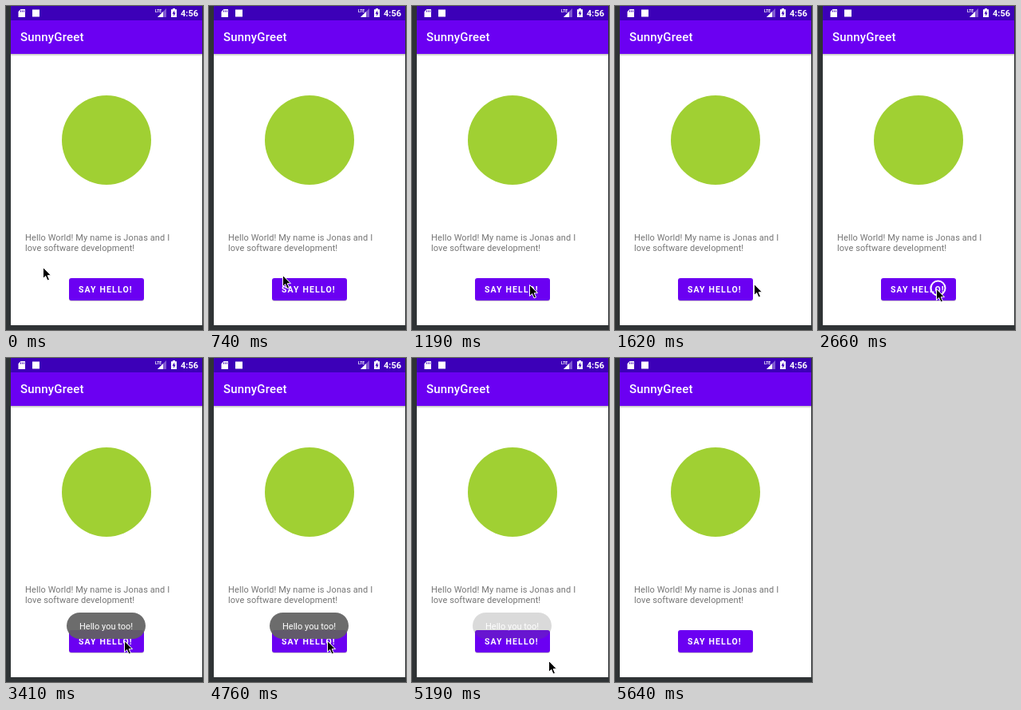
Write an HTML page that moves like this. It is 247x406 px and loops after 6.99 s.

```html
<!DOCTYPE html>
<html lang="en">
<head>
<meta charset="utf-8">
<title>Greeting app</title>
<style>
  html, body { margin: 0; width: 100%; height: 100%; overflow: hidden; background: #2f3335; }
  svg { display: block; width: 247px; height: 406px; }
  text { font-family: Roboto, "Open Sans", sans-serif; fill: #fff; white-space: pre; }
  .title { font-size: 15px; font-weight: 500; letter-spacing: .19px; }
  .body { font-size: 11px; letter-spacing: .1px; fill: #757575; }
  .label { font-size: 10.5px; font-weight: 700; letter-spacing: 1.15px; }
  .note { font-size: 11px; }
  .clock { font-size: 11px; font-weight: 700; }
  .lte { font-size: 5px; font-weight: 700; }
</style>
</head>
<body>
<svg viewBox="0 0 247 406">
  <defs>
    <linearGradient id="shade" x2="0" y2="1">
      <stop offset="0" stop-color="#000" stop-opacity=".26"/>
      <stop offset="1" stop-color="#000" stop-opacity="0"/>
    </linearGradient>
    <clipPath id="buttonClip"><rect x="79" y="341" width="94" height="28" rx="3"/></clipPath>
  </defs>

  <rect width="247" height="406" fill="#2f3335"/>
  <rect x="6" y="60" width="240" height="340" fill="#fff"/>
  <rect x="6" y="60" width="240" height="3" fill="url(#shade)"/>
  <rect x="6" y="18" width="240" height="42" fill="#6b00f2"/>
  <rect x="6" width="240" height="18" fill="#3c00b8"/>

  <!-- status bar -->
  <path d="M18.5 4H24V14H15.5V7Z" fill="#fff"/>
  <path d="M18.5 5.5V7.5M20.5 5.5V7.5M22.5 5.5V7.5" stroke="#3c00b8"/>
  <rect x="33" y="4.5" width="9" height="9" fill="#fff"/>
  <text class="lte" x="187" y="8">LTE</text>
  <path d="M201 3V14H190Z" fill="#fff" opacity=".35"/>
  <path d="M197 7V14H190Z" fill="#fff"/>
  <path d="M209 3H212V4.2H214V14H207V4.2H209Z" fill="#fff"/>
  <path d="M211.2 5.5L208.5 9.8H210.2V12.8L212.7 8.5H211.2Z" fill="#3c00b8"/>
  <text class="clock" x="219" y="13">4:56</text>

  <text class="title" x="18" y="44">SunnyGreet</text>
  <circle cx="126" cy="168" r="56" fill="#a0d033"/>
  <text class="body" x="24" y="294">Hello World! My name is Jonas and I</text>
  <text class="body" x="24" y="307">love software development!</text>

  <!-- button -->
  <rect x="79" y="342" width="94" height="28" rx="3" fill="#000" opacity=".2"/>
  <rect x="79" y="341" width="94" height="28" rx="3" fill="#6b00f2"/>
  <g clip-path="url(#buttonClip)"><circle id="ripple" cx="149" cy="355" fill="#fff"/></g>
  <text class="label" x="91" y="359">SAY HELLO!</text>

  <g id="toast">
    <rect x="76" y="319" width="99" height="33" rx="16.5" fill="#616161" opacity=".93"/>
    <text class="note" x="92" y="340">Hello you too!</text>
  </g>

  <circle id="ring" cx="150.5" cy="353.5" r="9" fill="none" stroke="#fff" stroke-width="2"/>
  <path id="cursor" d="M.5 .5V14.5L3.7 11.5L6 17L8.5 16L6.2 10.7H10.5Z"
        fill="#000" stroke="#fff" stroke-width="1" stroke-linejoin="round"/>
</svg>
<script>
const LOOP = 6990, FIRST = 290, STEP = 148;

// Cursor stops: [step, x, y]
const stops = [
  [-1, 46, 327], [7, 168, 354], [8, 174, 348], [9, 169, 343],
  [12, 148, 354], [30, 148, 354], [36, 210, 420]
];

const el = id => document.getElementById(id);
const [cursor, toast, ripple, ring] = ["cursor", "toast", "ripple", "ring"].map(el);

const ramp = (n, from, to) => Math.min(1, Math.max(0, (n - from) / (to - from)));

// Each leg starts gently and speeds up.
function cursorAt(n) {
  const i = Math.max(1, stops.findIndex(s => s[0] >= n));
  const [from, x0, y0] = stops[i - 1];
  const [to, x1, y1] = stops[i];
  const p = ramp(n, from, to) ** 1.4;
  return [x0 + (x1 - x0) * p, y0 + (y1 - y0) * p].map(Math.round);
}

function draw(t) {
  const n = Math.min(36, Math.max(-1, Math.floor((t - FIRST) / STEP)));
  cursor.setAttribute("transform", `translate(${cursorAt(n)})`);
  ring.setAttribute("opacity", n === 16 ? 1 : 0);
  ripple.setAttribute("r", 75 * ramp(n, 16, 18));
  ripple.setAttribute("opacity", .24 * (1 - ramp(n, 19, 21)));
  toast.setAttribute("opacity", ramp(n, 17, 21) * (1 - ramp(n, 30, 34)));
}

const start = performance.now();
function tick() {
  draw((performance.now() - start) % LOOP);
  requestAnimationFrame(tick);
}
tick();
</script>
</body>
</html>
```
